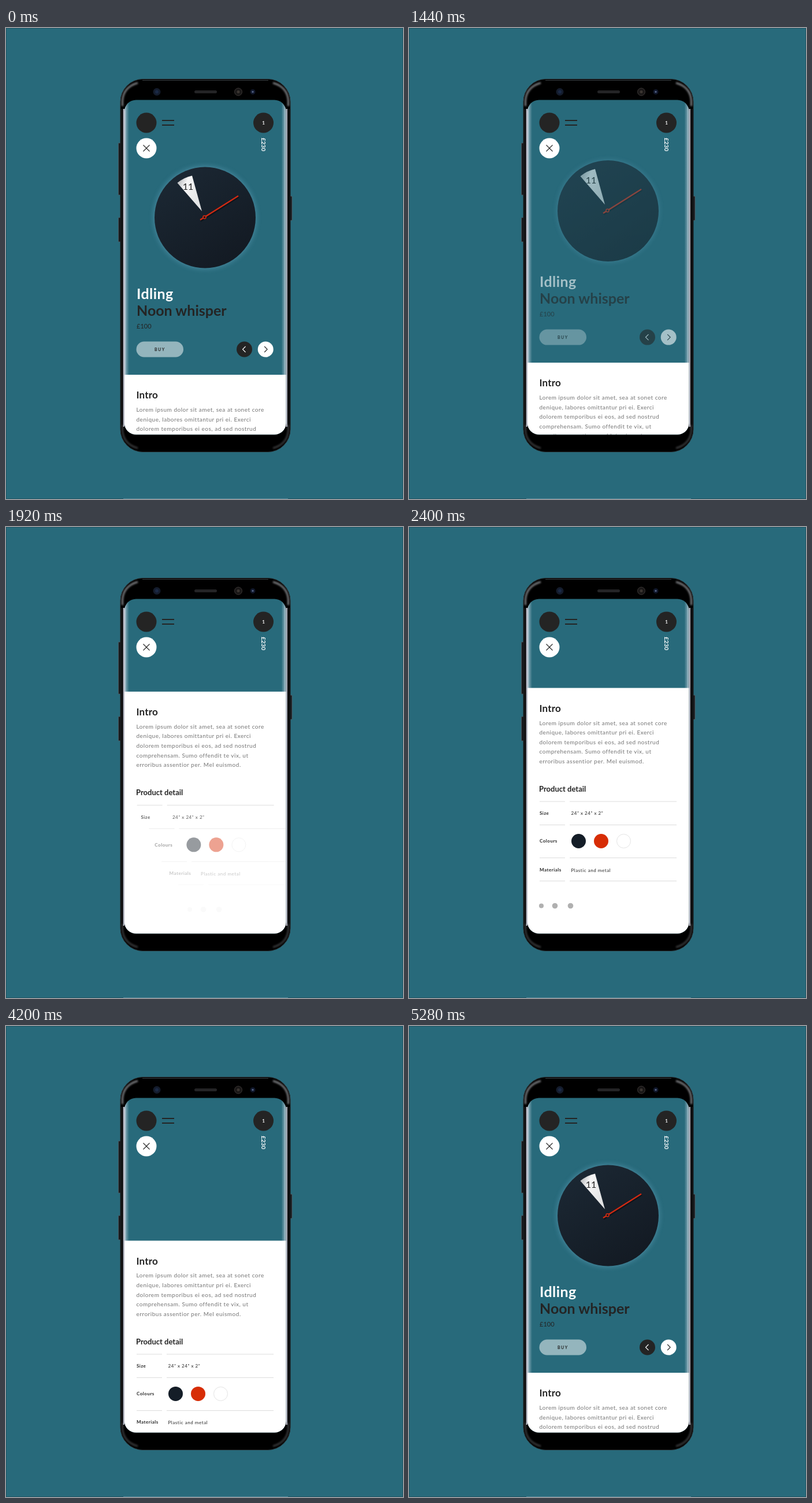
Write an HTML page that moves like this. It is 687 px wide and 815 px high and loops after 5760 ms.

```html
<!DOCTYPE html>
<html lang="en">
<head>
<meta charset="utf-8">
<title>Product page</title>
<style>
  html, body { margin: 0; width: 100%; height: 100%; overflow: hidden; background: #286a7b; }
  svg { display: block; width: 100%; height: 100%; }
  text { font-family: Lato, "Open Sans", sans-serif; fill: #242424; }
  .bold { font-weight: 700; }
  .title { font-size: 25px; font-weight: 700; }
  .body { font-size: 10px; letter-spacing: .52px; fill: #747474; }
  .label { font-size: 8px; font-weight: 700; letter-spacing: .5px; }
  .value { font-size: 8px; letter-spacing: .55px; }
  .rule { stroke: #dcdcdc; }
  .thin { fill: none; stroke: #242424; stroke-width: 1.1; }
</style>
</head>
<body>
<svg viewBox="0 0 687 815">
  <defs>
    <clipPath id="screen"><rect x="205" y="124.5" width="279.5" height="579" rx="20"/></clipPath>
    <linearGradient id="edge">
      <stop offset="0" stop-color="#e4e9f1" stop-opacity=".9"/>
      <stop offset=".4" stop-color="#c5d3de" stop-opacity=".45"/>
      <stop offset="1" stop-color="#c5d3de" stop-opacity="0"/>
    </linearGradient>
    <linearGradient id="face" x2=".7" y2="1">
      <stop offset="0" stop-color="#1c2935"/>
      <stop offset="1" stop-color="#131a23"/>
    </linearGradient>
    <linearGradient id="slot" x1=".1" y1=".2" x2=".9" y2=".7">
      <stop offset="0" stop-color="#c9cbcd"/>
      <stop offset=".25" stop-color="#f6f6f6"/>
      <stop offset="1" stop-color="#e2e3e4"/>
    </linearGradient>
    <filter id="soft" x="-20%" y="-20%" width="140%" height="140%"><feGaussianBlur stdDeviation="4"/></filter>
    <filter id="shine" x="-50%" y="-50%" width="200%" height="200%"><feGaussianBlur stdDeviation="1.6"/></filter>
    <g id="cornerShine">
      <path d="M201.5 135V126Q203 102 228 95" fill="none" stroke="#a7a9ad" stroke-width="3" opacity=".75" filter="url(#shine)"/>
    </g>
  </defs>

  <rect width="687" height="815" fill="#286a7b"/>
  <rect x=".5" y=".5" width="686" height="814" fill="none" stroke="#1d5464"/>
  <path d="M203 814.5H488" stroke="#55899a"/>

  <!-- phone body -->
  <g fill="#16181b" stroke="#59646b" stroke-width=".8">
    <rect x="194.5" y="199" width="5" height="90" rx="1"/>
    <rect x="194.5" y="328" width="5" height="42" rx="1"/>
    <rect x="490" y="291" width="5" height="42" rx="1"/>
  </g>
  <rect x="198" y="88.5" width="294" height="645" rx="39" fill="#000" stroke="#24282b"/>
  <path d="M236 90.5H454" stroke="#3c4144" stroke-width="1.2"/>
  <use href="#cornerShine"/>
  <use href="#cornerShine" transform="matrix(-1 0 0 1 690 0)"/>
  <g opacity=".45">
    <use href="#cornerShine" transform="matrix(1 0 0 -1 0 822)"/>
    <use href="#cornerShine" transform="matrix(-1 0 0 -1 690 822)"/>
  </g>
  <path d="M203.8 140V690M485.8 140V690" stroke="#b4b6c2" stroke-width="2.4"/>
  <path d="M200 140V690M489.5 140V690" stroke="#2c2e31"/>
  <rect x="326" y="108" width="39" height="5" rx="2.5" fill="#242426"/>
  <circle cx="261" cy="110.500" r="6.500" fill="#141c2c"/>
  <circle cx="261" cy="110.500" r="3" fill="#1b2945"/>
  <circle cx="402" cy="110.500" r="6.500" fill="#191717" stroke="#3b3735"/>
  <circle cx="402" cy="110.500" r="2.500" fill="#3b3531"/>
  <circle cx="427" cy="110.500" r="4.500" fill="#10172a"/>
  <circle cx="427" cy="110.500" r="1.700" fill="#536184"/>

  <g clip-path="url(#screen)">
    <rect x="205" y="124" width="280" height="580" fill="#286a7b"/>
    <rect x="205" y="124" width="8" height="580" fill="url(#edge)"/>
    <rect x="205" y="124" width="8" height="580" fill="url(#edge)" transform="matrix(-1 0 0 1 689.500 0)"/>

    <g id="clock">
      <circle cx="344.500" cy="328" r="89" fill="#5798b0" opacity=".65" filter="url(#soft)"/>
      <circle cx="344.500" cy="328" r="87.500" fill="url(#face)"/>
      <path d="M339 317L296.500 268Q308 258.500 322 255.500Z" fill="url(#slot)"/>
      <text x="315" y="280" font-size="16" text-anchor="middle">11</text>
      <path d="M337 334L403 292" stroke="#090d12" stroke-width="3" opacity=".6"/>
      <path d="M336 332L402 290.500" stroke="#d32a12" stroke-width="2.300"/>
      <circle cx="343.500" cy="327.300" r="2.600" fill="#231a1d" stroke="#d32a12" stroke-width="1.500"/>
    </g>

    <g id="offer">
      <text class="title" x="226" y="469" letter-spacing=".4" style="fill:#fff">Idling</text>
      <text class="title" x="226" y="497.500">Noon whisper</text>
      <text x="226" y="519.500" font-size="11">£100</text>
      <rect x="225.500" y="542.500" width="81.500" height="27" rx="13.500" fill="#94b5bd"/>
      <text class="bold" x="257" y="558.700" font-size="7" letter-spacing="1.500">BUY</text>
      <circle cx="412.500" cy="556" r="13.500" fill="#242424"/>
      <path class="thin" d="M414.500 551L409.500 556L414.500 561" style="stroke:#fff"/>
      <circle cx="449.200" cy="556" r="13.500" fill="#fff"/>
      <path class="thin" d="M447.200 551L452.200 556L447.200 561"/>
    </g>

    <!-- fixed header -->
    <circle cx="243" cy="164" r="17.500" fill="#242424"/>
    <path d="M270 160H291M270 168H291" stroke="#242424" stroke-width="2.200"/>
    <circle cx="445.500" cy="164" r="17.500" fill="#242424"/>
    <text class="bold" x="445.500" y="166.800" font-size="8" text-anchor="middle" style="fill:#fff">1</text>
    <text class="bold" transform="translate(442.300 190) rotate(90)" font-size="10" style="fill:#fff">£230</text>
    <circle cx="243" cy="208" r="17.500" fill="#fff"/>
    <path class="thin" d="M237.500 202.500L248.500 213.500M248.500 202.500L237.500 213.500"/>

    <!-- sheet, drawn relative to its top edge -->
    <g id="sheet">
      <rect x="205" width="280" height="600" fill="#fff"/>
      <text class="bold" x="225.500" y="41.300" font-size="17" letter-spacing=".2">Intro</text>
      <g id="copy"></g>
      <text class="bold" x="225" y="179.500" font-size="13">Product detail</text>
      <g class="row"><path class="rule" d="M226 196.500H270M278 196.500H463"/></g>
      <g class="row">
        <text class="label" x="226" y="219.800">Size</text>
        <text class="value" x="280.500" y="219.800">24” x 24” x 2”</text>
      </g>
      <g class="row"><path class="rule" d="M226 237H270M278 237H463"/></g>
      <g class="row">
        <text class="label" x="226" y="267.800">Colours</text>
        <circle cx="293.500" cy="265" r="12.500" fill="#141d27"/>
        <circle cx="332.500" cy="265" r="12.500" fill="#d72d06"/>
        <circle cx="371.500" cy="265" r="12" fill="#fff" stroke="#e4e4e4"/>
      </g>
      <g class="row"><path class="rule" d="M226 294H270M278 294H463"/></g>
      <g class="row">
        <text class="label" x="226" y="317">Materials</text>
        <text class="value" x="280.500" y="318">Plastic and metal</text>
      </g>
      <g class="row"><path class="rule" d="M226 334H270M278 334H463"/></g>
      <g class="row" fill="#b0b0b0">
        <circle cx="229" cy="377" r="4"/>
        <circle cx="252.500" cy="377" r="4.800"/>
        <circle cx="279.500" cy="377" r="4.800"/>
      </g>
    </g>
  </g>
</svg>
<script>
  const LOOP = 5760, STEP = 40;
  const SHEET_TOP = 600, SCROLL = 321.5, SCROLL_MS = 833;
  const OPEN_AT = 1229, CLOSE_AT = 3853;
  const ROW_MS = 500, ROW_SHIFT = 100;
  const rowSlots = [0, 2, 4, 5, 6, 7, 8, 9];   // lines and rows enter in a stagger

  const byId = id => document.getElementById(id);
  const clock = byId("clock"), offer = byId("offer"), sheet = byId("sheet");
  const rows = document.querySelectorAll(".row");

  [
    "Lorem ipsum dolor sit amet, sea at sonet core",
    "denique, labores omittantur pri ei. Exerci",
    "dolorem temporibus ei eos, ad sed nostrud",
    "comprehensam. Sumo offendit te vix, ut",
    "erroribus assentior per. Mel euismod."
  ].forEach((line, i) => {
    byId("copy").innerHTML += `<text class="body" x="225.5" y="${64 + i * 16.6}">${line}</text>`;
  });

  const clamp = x => Math.min(1, Math.max(0, x));
  const easeInOut = x => x < .5 ? 4 * x ** 3 : 1 - 4 * (1 - x) ** 3;
  const scrollPart = (t, start) => easeInOut(clamp((t - start) / SCROLL_MS));

  function place(node, x, y, opacity) {
    node.setAttribute("transform", `translate(${x} ${y})`);
    node.setAttribute("opacity", opacity);
  }

  function draw(t) {
    const scroll = SCROLL * (scrollPart(t, OPEN_AT) - scrollPart(t, CLOSE_AT));
    const fade = scroll > 200 ? 0 : Math.exp(-scroll / 38);
    place(clock, 0, -scroll * .55, fade);
    place(offer, 0, -scroll, fade);
    place(sheet, 0, SHEET_TOP - scroll, 1);
    rows.forEach((row, i) => {
      const shown = clamp((t - 1460 - 48 * rowSlots[i]) / ROW_MS);
      place(row, ROW_SHIFT * (1 - shown) ** 2, 0, shown);
    });
  }

  const began = performance.now();
  function tick() {
    const t = (performance.now() - began) % LOOP;
    draw(Math.floor(t / STEP) * STEP);
    requestAnimationFrame(tick);
  }
  tick();
</script>
</body>
</html>
```
